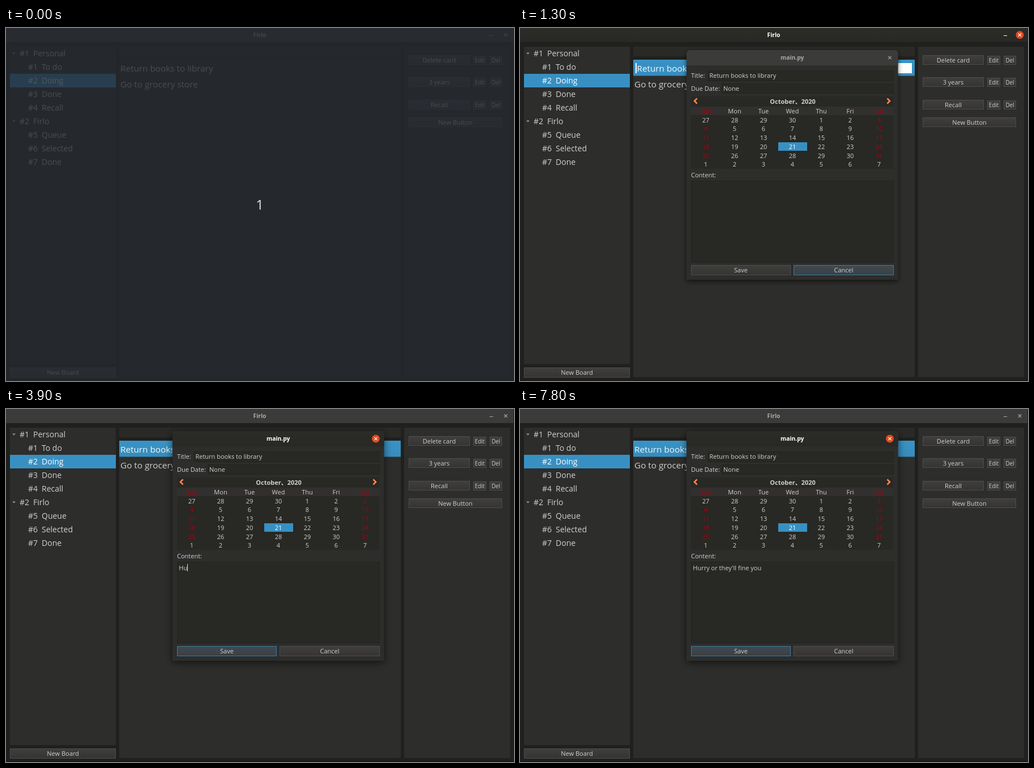
An HTML page with a canvas that plays this animation: 897x624 px, repeating every 8000 ms.

```html
<!DOCTYPE html>
<html lang="en">
<head>
<meta charset="utf-8">
<title>Task board</title>
<style>
html, body { margin: 0; width: 100%; height: 100%; overflow: hidden; background: #1f1f1d; }
canvas { display: block; }
</style>
</head>
<body>
<canvas id="stage" width="897" height="624"></canvas>
<script>
const ctx = document.getElementById('stage').getContext('2d');
const LOOP = 8000;
const APP = 'Firlo';
const FONT = '"Open Sans", "Noto Sans", "Noto Sans CJK SC", sans-serif';
const INK = '#d0d0ce', PANEL = '#2d2d2c', GAP = '#20201e', FIELD = '#282825', RED = '#ac0010';

// Typing: one time per character, and the times at which the caret blinks off.
const NOTE = "Hurry or they'll fine you";
const KEYS = [3700, 3900, 4100, 4200, 4300, 4400, 4600, 5000, 5100, 5300, 5400, 5500, 5600,
  5700, 5900, 6100, 6200, 6400, 6500, 6700, 7000, 7200, 7500, 7600, 7700];
const CARET_ON = 3600;
const CARET_OFF = [3000, 4800, 6000, 6600, 7800];

function rect(x0, y0, x1, y1, fill) {
  ctx.fillStyle = fill;
  ctx.fillRect(x0, y0, x1 - x0, y1 - y0);
}

function frame(x0, y0, x1, y1, color) {
  ctx.strokeStyle = color;
  ctx.lineWidth = 1;
  ctx.strokeRect(x0 + .5, y0 + .5, x1 - x0 - 1, y1 - y0 - 1);
}

function shade(y0, y1, top, bottom) {
  const g = ctx.createLinearGradient(0, y0, 0, y1);
  g.addColorStop(0, top);
  g.addColorStop(1, bottom);
  return g;
}

// cy is the middle of the capital letters.
function text(s, x, cy, size = 11, color = INK, align = 'left', weight = 400) {
  ctx.font = `${weight} ${size}px ${FONT}`;
  ctx.textAlign = align;
  ctx.fillStyle = color;
  ctx.fillText(s, x, cy + size * .36);
}

function line(points, color, width) {
  ctx.beginPath();
  points.forEach(([x, y]) => ctx.lineTo(x, y));
  ctx.strokeStyle = color;
  ctx.lineWidth = width;
  ctx.stroke();
}

function button(label, x0, y0, x1, y1, size = 11, active = false) {
  rect(x0, y0, x1, y1, active ? shade(y0, y1, '#434a4e', '#384046') : shade(y0, y1, '#403f3e', '#353433'));
  frame(x0, y0, x1, y1, active ? '#397c9f' : '#4d4d4b');
  text(label, (x0 + x1) / 2, (y0 + y1) / 2 + .2, size, INK, 'center');
}

function field(x0, y0, x1, y1) {
  rect(x0, y0, x1, y1, FIELD);
  frame(x0, y0, x1, y1, '#222220');
}

function closeMark(x, y, color) {
  line([[x - 2.7, y - 2.7], [x + 2.7, y + 2.7]], color, 1.2);
  line([[x + 2.7, y - 2.7], [x - 2.7, y + 2.7]], color, 1.2);
}

// Title bar, blended from its inactive to its active look by focus 0..1.
function titleBar(title, x0, y0, x1, y1, cy, closeX, radius, size, focus) {
  const look = (fill, ink, active) => {
    ctx.beginPath();
    ctx.roundRect(x0, y0, x1 - x0, y1 - y0, [radius, radius, 0, 0]);
    ctx.fillStyle = fill;
    ctx.fill();
    text(title, (x0 + x1) / 2, cy, size, ink, 'center', 700);
    if (active) {
      ctx.beginPath();
      ctx.arc(closeX, cy, 7, 0, 7);
      ctx.fillStyle = '#dd4a20';
      ctx.fill();
    }
    closeMark(closeX, cy, active ? '#fff' : ink);
    if (!radius) rect(854, 13, 860, 14, ink);
  };
  look('#3b3b39', '#a9a9a6', false);
  if (!focus) return;
  ctx.globalAlpha = focus;
  look(shade(y0, y1, '#2b2b27', '#282825'), '#fff', true);
  ctx.globalAlpha = 1;
}

function sidebar() {
  const rows = ['Personal', 'To do', 'Doing', 'Done', 'Recall', APP, 'Queue', 'Selected', 'Done'];
  rect(7, 33, 194, 594, PANEL);
  rect(7, 81, 194, 105, '#3890c2');
  let boards = 0, lists = 0;
  rows.forEach((name, i) => {
    const cy = 45 + 24 * i, board = i === 0 || i === 5, x = board ? 24 : 39;
    const ink = i === 2 ? '#fff' : INK;
    text('#' + (board ? ++boards : ++lists), x, cy, 14, ink);
    text(name, x + 24, cy, 14, ink);
    if (board) {
      ctx.fillStyle = '#999';
      ctx.beginPath();
      ctx.moveTo(11, cy - 1.5);
      ctx.lineTo(17, cy - 1.5);
      ctx.lineTo(14, cy + 1.5);
      ctx.fill();
    }
  });
  button('New Board', 7, 600, 194, 618);
}

function cards(selected, editing) {
  const first = 'Return books to library';
  rect(200, 33, 697, 50, '#292926');
  rect(200, 56, 697, 617, PANEL);
  if (selected) rect(200, 56, 697, 84.5, shade(56, 84, '#3993c6', '#378cbb'));
  if (editing) {
    rect(204, 62, 692, 80, '#fff');
    rect(206, 62, 371, 80, '#3890c2');
  }
  text(first, editing ? 206.5 : 202, 71, 15.3, selected ? '#f4f8fa' : INK);
  text('Go to grocery store', 202, 99.5, 15.3);
}

function actions() {
  rect(703, 33, 890, 617, PANEL);
  ['Delete card', '3 years', 'Recall'].forEach((name, i) => {
    const y = 48 + Math.round(39.4 * i);
    button(name, 711, y, 819, y + 17);
    button('Edit', 825, y + 1, 848, y + 17, 9.9);
    button('Del', 854, y + 1, 876, y + 17, 9.9);
  });
  button('New Button', 711, 158, 876, 175);
}

function calendar() {
  rect(302, 121, 659, 249, FIELD);
  rect(302, 139, 659, 154, '#32302f');
  for (const [x, d] of [[310, -1], [651, 1]]) {
    const arrow = [[x - 2.5 * d, 124.5], [x + 2 * d, 129], [x - 2.5 * d, 133.5]];
    line(arrow, '#e2562c', 3);
    line(arrow, '#f9a868', 1.2);
  }
  text('October、2020', 481.5, 130, 11, INK, 'center', 700);
  ['Sun', 'Mon', 'Tue', 'Wed', 'Thu', 'Fri', 'Sat'].forEach((day, col) => {
    const x = 328 + 51 * col, weekend = col % 6 === 0;
    text(day, x, 147, 11, weekend ? RED : INK, 'center');
    for (let row = 0; row < 6; row++) {
      const n = row * 7 + col - 3, inMonth = n > 0 && n < 32;
      const cy = 162.8 + 15.7 * row;
      if (n === 21) rect(456, 202, 507, 217, '#3890c2');
      text(n < 1 ? n + 30 : n > 31 ? n - 31 : n, x, cy, 11,
        weekend && inMonth ? RED : n === 21 ? '#fff' : INK, 'center');
    }
  });
}

function note(t) {
  const typed = KEYS.filter(k => k <= t).length;
  const s = NOTE.slice(0, typed);
  text(s, 305.3, 280.8);
  const shown = Math.max(2400, t >= CARET_ON ? CARET_ON : 0, typed ? KEYS[typed - 1] : 0);
  const hidden = CARET_OFF.some(off => off <= t && off > shown);
  if (t < 2400 || hidden) return;
  const x = Math.round(305.3 + ctx.measureText(s).width);
  rect(x, 274, x + 1, 287, '#e4e4e2');
}

function dialog(t, focus) {
  ctx.save();
  ctx.shadowColor = 'rgba(0,0,0,.6)';
  ctx.shadowBlur = focus ? 14 : 9;
  ctx.shadowOffsetY = 3;
  ctx.beginPath();
  ctx.roundRect(294, 39, 373.5, 406, [6, 6, 0, 0]);
  ctx.fillStyle = PANEL;
  ctx.fill();
  ctx.restore();
  titleBar('main.py', 294, 39, 667.5, 66, 52.5, 653, 6, 10.3, focus);
  text('Title:', 302, 84);
  field(332, 75, 660, 94);
  text('Return books to library', 334.5, 84);
  text('Due Date:', 302, 107.3);
  field(356, 98, 660, 116);
  text('None', 359, 107.3);
  calendar();
  text('Content:', 302, 260);
  field(302, 270, 660, 414);
  note(t);
  button('Save', 302, 419, 478, 437, 11, focus > 0);
  button('Cancel', 483, 419, 660, 437, 11, !focus);
}

// Hard step through two values at the times a and b, with a halfway look between.
const fade = (t, a, b) => t < a ? 0 : t < b ? .5 : 1;

function draw(t) {
  const dialogFocus = fade(t, 2400, 2500);
  const mainFocus = fade(t, 900, 1000) - dialogFocus;
  rect(0, 0, 897, 624, GAP);
  titleBar(APP, 0, 0, 896, 26, 12.2, 882.5, 0, 10.3, mainFocus);
  rect(0, 25, 897, 26, '#1c1c1a');
  rect(0, 622, 897, 624, '#191917');
  sidebar();
  cards(t >= 900, t >= 1200 && t < 2400);
  actions();
  if (t >= 1300) dialog(t, dialogFocus);
  if (t < 100) {
    rect(0, 0, 897, 624, 'rgba(36,41,48,.79)');
    text('1', 448, 312, 24, '#e6e6e6', 'center');
  }
}

const start = performance.now();
function tick() {
  draw((performance.now() - start) % LOOP);
  requestAnimationFrame(tick);
}
tick();
</script>
</body>
</html>
```
